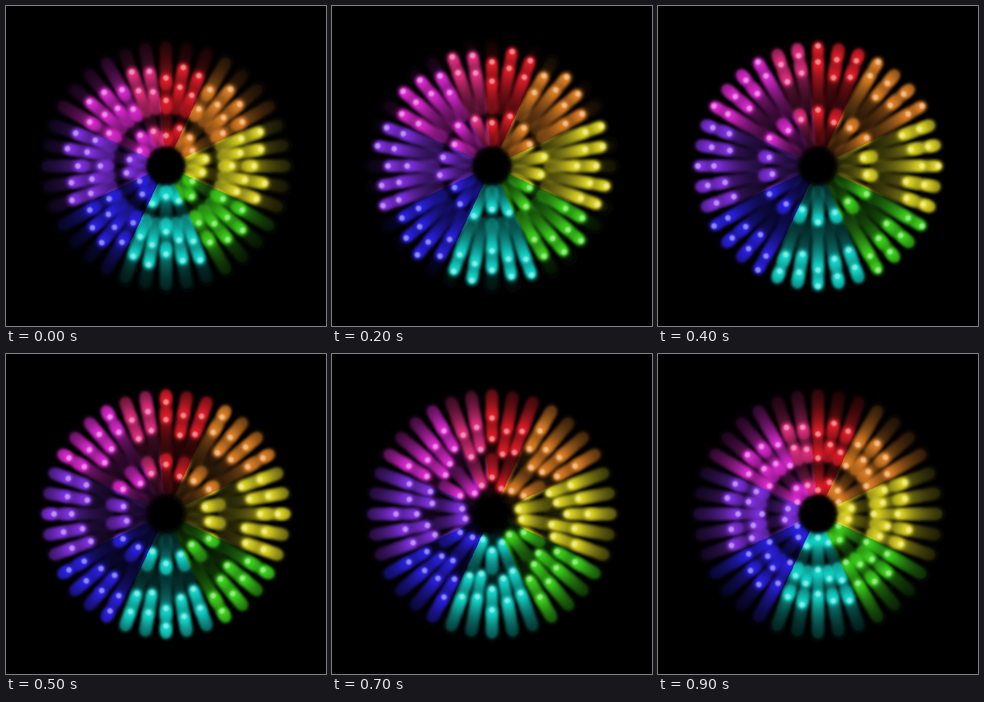
An HTML page with a canvas that plays this animation: 400x400 px, repeating every 1 s.

```html
<!DOCTYPE html>
<html lang="en">
<head>
<meta charset="utf-8">
<title>Pulsing colour wheel</title>
<style>
  html, body { margin: 0; width: 100%; height: 100%; overflow: hidden; background: #000; }
  canvas { display: block; width: 400px; height: 400px; }
</style>
</head>
<body>
<canvas id="stage" width="400" height="400"></canvas>
<script>
const LOOP = 1000, HOLD = 100, STEP = 20, TRAIL = 900, DECAY = 320;
const SIZE = 400, MID = 200, WIDE = 24, GLOW = 11, CORE = 5;
const PEAKS = [400, 250, 300];
const OUTER = [[70, 130], [100, 150]];
const INNER = [[30, 70]];

// colour and the angle in degrees, clockwise from the top, where it ends
const SECTORS = [
  ['#e01c28', 25], ['#e08024', 65], ['#e0d824', 115], ['#3cd41c', 155], ['#14dace', 205],
  ['#2a20e4', 245], ['#8230e4', 295], ['#dc28d0', 335], ['#e42e80', 355], ['#e01c28', 360]
];

function makeCanvas(w, h) {
  const c = document.createElement('canvas');
  c.width = w;
  c.height = h;
  return c;
}

function makeDot(radius, stops) {
  const c = makeCanvas(radius * 2, radius * 2), g = c.getContext('2d');
  const fill = g.createRadialGradient(radius, radius, 0, radius, radius, radius);
  for (const [at, alpha] of stops) fill.addColorStop(at, `rgba(255,255,255,${alpha})`);
  g.fillStyle = fill;
  g.fillRect(0, 0, radius * 2, radius * 2);
  return c;
}

const glow = makeDot(GLOW, [[0, 1], [0.35, 0.7], [0.6, 0.22], [0.8, 0.06], [1, 0]]);
const core = makeDot(CORE, [[0, 0.52], [0.5, 0.42], [0.8, 0.1], [1, 0]]);
const ctx = document.getElementById('stage').getContext('2d');

const wheel = ctx.createConicGradient(-Math.PI / 2, MID, MID);
let from = 0;
for (const [colour, end] of SECTORS) {
  wheel.addColorStop(from / 360, colour);
  wheel.addColorStop(end / 360, colour);
  from = end;
}

// triangle wave: 1 at the peak time, 0 half a loop later
function wave(time, peak) {
  const p = (((time - peak) / LOOP) % 1 + 1) % 1;
  return Math.abs(1 - 2 * p);
}

function radii(ranges, time, peak) {
  const k = wave(time, peak);
  return ranges.map(([lo, hi]) => lo + (hi - lo) * k);
}

const strips = [OUTER, INNER].map(ranges => PEAKS.map(peak =>
  ({ ranges, peak, canvas: makeCanvas(WIDE, 170) })));

// one spoke with its fading trail, radius growing downwards
function drawStrip({ ranges, peak, canvas }, time) {
  const g = canvas.getContext('2d');
  const fade = 1 - Math.exp(-STEP / DECAY);
  g.fillStyle = '#000';
  g.fillRect(0, 0, WIDE, canvas.height);
  for (let age = TRAIL; age >= 0; age -= STEP) {
    g.globalAlpha = fade;
    g.fillRect(0, 0, WIDE, canvas.height);
    g.globalAlpha = 1;
    for (const r of radii(ranges, time - age, peak)) {
      g.drawImage(glow, WIDE / 2 - GLOW, r - GLOW);
    }
  }
}

function eachSpoke(paint) {
  strips.forEach((set, ring) => {
    const count = ring ? 18 : 36;
    for (let i = 0; i < count; i++) {
      ctx.save();
      ctx.translate(MID, MID);
      ctx.rotate(Math.PI + i * 2 * Math.PI / count);
      paint(set[i % 3]);
      ctx.restore();
    }
  });
}

function render(time) {
  strips.flat().forEach(s => drawStrip(s, time));

  ctx.globalCompositeOperation = 'source-over';
  ctx.fillStyle = '#000';
  ctx.fillRect(0, 0, SIZE, SIZE);

  ctx.globalCompositeOperation = 'screen';
  eachSpoke(s => ctx.drawImage(s.canvas, -WIDE / 2, 0));

  ctx.globalCompositeOperation = 'multiply';
  ctx.fillStyle = wheel;
  ctx.fillRect(0, 0, SIZE, SIZE);

  ctx.globalCompositeOperation = 'source-over';
  eachSpoke(s => {
    for (const r of radii(s.ranges, time, s.peak)) ctx.drawImage(core, -CORE, r - CORE);
  });
}

const start = performance.now();
let shown = -1;

function tick() {
  const time = Math.floor((performance.now() - start) % LOOP / HOLD) * HOLD;
  if (time !== shown) render(shown = time);
  requestAnimationFrame(tick);
}
tick();
</script>
</body>
</html>
```
